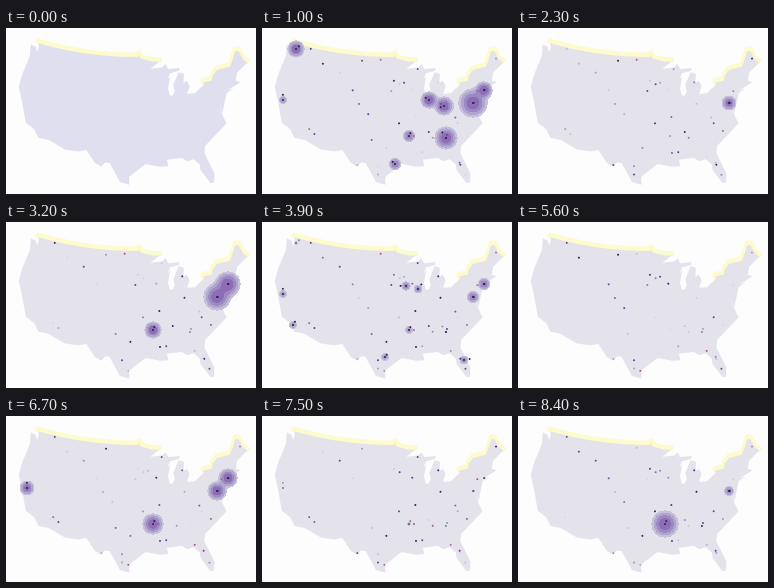
Write a matplotlib script that moves like this. It is 250 px wide and 166 px high and loops after 8.5 s.

```python
import numpy as np
import matplotlib.pyplot as plt
from matplotlib.animation import FuncAnimation
from matplotlib.path import Path

W, H, DPI = 250, 166, 100
FRAMES, STEP_MS = 85, 100
PT = 72 / DPI

PAPER, RIM = "#fdfdfd", "#fdfbcb"
LAND_IDLE, LAND_LIVE = "#dfdfef", "#e4e3ec"
LEVELS = [0.135, 0.26, 0.46, 0.72, 9]
HEAT = ["#c6c0da", "#b0a5cf", "#9c89c2", "#8c6db6"]
INKS = ["#3b2a6b", "#6a3f95", "#a0587f", "#4a4a9c", "#2e2444"]


def albers(points):
    """Equal-area conic projection of the lower 48 states, in stage pixels."""
    lon, lat = np.array(points).T
    p1, p2, lat0 = np.radians([29.5, 45.5, 37.5])
    n = (np.sin(p1) + np.sin(p2)) / 2
    c = np.cos(p1) ** 2 + 2 * n * np.sin(p1)

    def rho(phi):
        return 6371 * np.sqrt(c - 2 * n * np.sin(phi)) / n

    r, theta = rho(np.radians(lat)), n * np.radians(lon + 96)
    x, y = r * np.sin(theta), rho(lat0) - r * np.cos(theta)
    return 129.5 + 0.0497 * x, 92.7 - 0.0497 * y


# Key points of the border, clockwise from the northwest.
NORTH = [(lon, 49) for lon in np.linspace(-122.8, -95.2, 30)]
NORTH += [(-95.1, 49.4), (-94.6, 48.7), (-91.5, 48.1), (-89.6, 48)]
LAKES = [
    (-92.1, 46.8), (-89, 46.9), (-88, 47.45), (-87.4, 46.5), (-84.4, 46.5),
    (-84.7, 46), (-87, 45.75), (-88, 44.6), (-87.1, 45.2), (-87.9, 43),
    (-87.6, 41.7), (-86.9, 41.7), (-86.3, 42.4), (-86.5, 43.6), (-84.8, 45.75),
    (-83.5, 45.35), (-83.9, 43.7), (-83, 44.05), (-82.5, 43), (-83.4, 41.7),
    (-81.5, 41.6),
]
NORTHEAST = [
    (-78.9, 42.85), (-79.05, 43.27), (-76.8, 43.3), (-76.3, 44.2), (-74.9, 45),
    (-71.5, 45), (-70.3, 46.2), (-69.2, 47.45), (-68.3, 47.35), (-67.8, 45.7),
    (-67, 44.85),
]
ATLANTIC = [
    (-70.2, 43.6), (-71, 42.3), (-70, 41.8), (-73.7, 40.95), (-72, 41.05),
    (-73.9, 40.55), (-74.9, 38.95), (-75.9, 37.2), (-76.3, 39), (-76, 36.9),
    (-75.5, 35.25), (-77.9, 33.9), (-81, 32), (-81.4, 30.7), (-80.05, 26.8),
    (-80.4, 25.2), (-81.1, 25.15), (-82.7, 27.8), (-82.7, 28.8), (-83.8, 29.9),
]
SOUTH = [
    (-85.2, 29.7), (-86.3, 30.4), (-89.4, 30.3), (-89.2, 29.1), (-90.9, 29.1),
    (-93.9, 29.7), (-97.3, 27.4), (-97.2, 25.95), (-99.1, 26.4), (-101.4, 29.77),
    (-102.4, 29.8), (-103.1, 29), (-104.5, 29.6), (-106.5, 31.75), (-108.2, 31.33),
    (-111.1, 31.33), (-114.8, 32.5), (-117.1, 32.5),
]
PACIFIC = [
    (-118.4, 33.8), (-120.6, 34.6), (-122.5, 37.8), (-124.4, 40.4), (-124.5, 42.8),
    (-124, 46.3), (-124.7, 48.4), (-123.2, 48.2), (-122.5, 47.4), (-122.4, 48.3),
]

# Hot spots: centre and the radius reached at each peak time in seconds.
HUBS = [
    ((34, 21), {1.0: 8, 4.6: 5}),
    ((21, 72), {1.0: 4, 4.6: 10, 6.7: 7}),
    ((31, 103), {4.6: 10}),
    ((144, 64), {4.6: 12}),
    ((156, 67), {4.6: 11}),
    ((167, 72), {1.0: 8}),
    ((182, 78), {1.0: 9}),
    ((133, 136), {1.0: 6}),
    ((123, 135), {4.6: 10}),
    ((147, 108), {1.0: 6, 3.2: 8, 4.6: 10, 6.7: 10, 8.4: 13}),
    ((184, 110), {1.0: 11, 4.6: 4}),
    ((202, 138), {4.6: 11}),
    ((211, 75), {1.0: 14, 2.3: 7, 3.2: 13, 4.6: 15, 6.7: 9, 8.4: 5}),
    ((222, 62), {1.0: 8, 3.2: 12, 4.6: 15, 6.7: 9}),
]
PULSE = 0.9

fig = plt.figure(figsize=(W / DPI, H / DPI), dpi=DPI, facecolor=PAPER)
ax = fig.add_axes([0, 0, 1, 1])
ax.set(xlim=(0, W), ylim=(H, 0))
ax.axis("off")

for part in (NORTH, NORTHEAST):
    x, y = albers(part)
    ax.plot(x, y - 2, color=RIM, lw=5 * PT, zorder=1)
border = np.column_stack(albers(NORTH + LAKES + NORTHEAST + ATLANTIC + SOUTH + PACIFIC))
land, = ax.fill(*border.T, lw=0, zorder=2)

# Lone towns, denser in the east, and a small cluster at every hub.
rng = np.random.default_rng(7)
spots = np.column_stack([W * np.sqrt(rng.random(200)), H * rng.random(200)])
towns = spots[Path(border).contains_points(spots)][:42]
phase = rng.random(len(towns))
rate = rng.integers(1, 4, len(towns))
hubs = np.array([centre for centre, _ in HUBS], float)
cluster = np.vstack([hubs, hubs + rng.normal(0, 3, hubs.shape)])


def scatter(points, inks):
    return ax.scatter(*points.T, s=2, c=inks, linewidths=0, zorder=5)


town_dots = scatter(towns, rng.choice(INKS, len(towns)))
hub_dots = scatter(cluster, [INKS[-1]] * len(cluster))

gx, gy = np.meshgrid(np.arange(0, W + 0.5, 0.5), np.arange(0, H + 0.5, 0.5))
heat = []


def step_of(frame):
    """Data step on show; a few steps stay on for longer."""
    if 1 <= frame <= 5:
        return 1
    return frame - 1 if frame in (38, 54) else frame


def radius(peaks, t):
    return max(r * max(0, 1 - ((t - peak) / PULSE) ** 2) for peak, r in peaks.items())


def field(radii):
    total = np.zeros_like(gx)
    for (cx, cy), r in zip(hubs, radii):
        if r > 1:
            d2 = (gx - cx) ** 2 + (gy - cy) ** 2
            total += min(1, r / 8) * np.exp(-2 * d2 / r ** 2)
    return total


def draw(frame):
    while heat:
        heat.pop().remove()
    step = step_of(frame)
    live = step > 0
    land.set_color(LAND_LIVE if live else LAND_IDLE)
    town_dots.set_visible(live)
    hub_dots.set_visible(live)
    if live:
        radii = np.array([radius(peaks, step * STEP_MS / 1000) for _, peaks in HUBS])
        wave = np.sin(2 * np.pi * (rate * step / FRAMES + phase))
        town_dots.set_alpha(np.clip(0.6 + 0.6 * wave, 0, 1))
        hub_dots.set_alpha(np.tile(np.clip(radii / 4, 0, 1), 2))
        z = field(radii)
        if z.max() > LEVELS[0]:
            heat.append(ax.contourf(gx, gy, z, LEVELS, colors=HEAT, zorder=3))
    return [land, town_dots, hub_dots]


anim = FuncAnimation(fig, draw, frames=FRAMES, interval=STEP_MS,
                     init_func=lambda: draw(0), repeat=True, repeat_delay=0)
plt.show()
```
